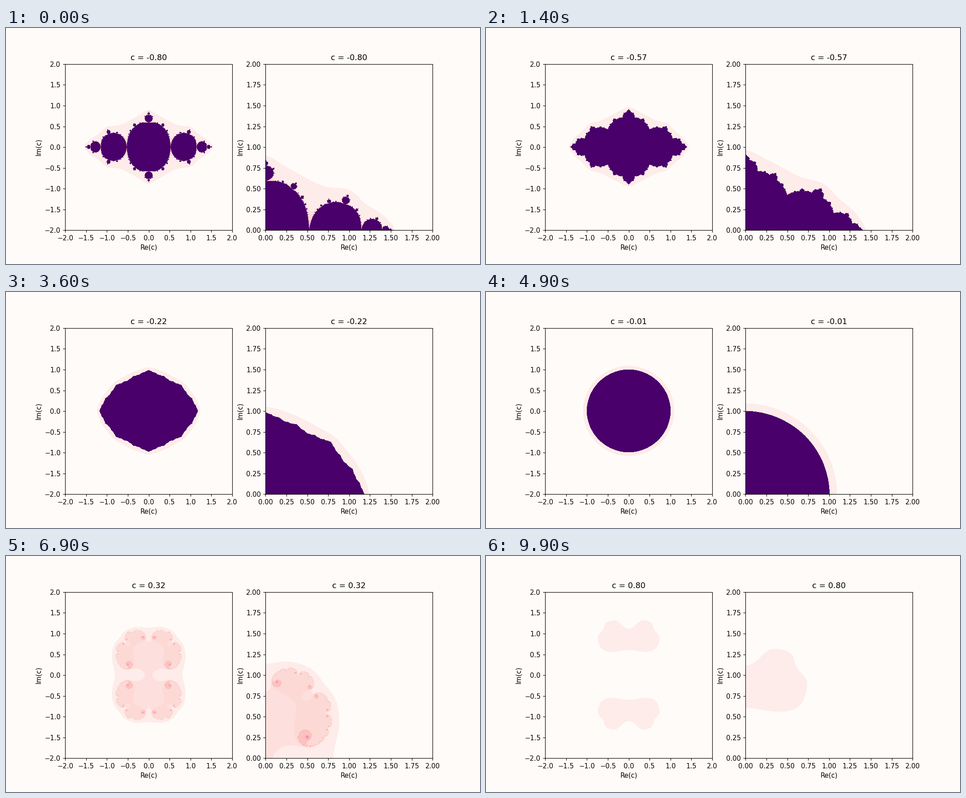
Recreate the animation shown at these times as a matplotlib script. Size 1058x529 px, loop 10 s.

```python
import matplotlib as mpl
import matplotlib.pyplot as plt
import numpy as np
from matplotlib.animation import FuncAnimation

FRAMES = 100
MAX_ITER = 100
ESCAPE = 4.0
PAPER = "#fffbf8"
SIDE = 373  # grid points across one panel

c_values = np.linspace(-0.8, 0.8, FRAMES)
axis = np.linspace(0, 2, SIDE)
quadrant = (axis[None, :] + 1j * axis[:, None]).ravel()


def build_palette():
    """RdPu over the iteration counts, with flat bands at the pale end."""
    pal = mpl.colormaps["RdPu"](np.arange(MAX_ITER + 1) / MAX_ITER)
    pal[22:32] = pal[26]
    bands = [(0, 5, PAPER), (5, 12, "#fdece9"),
             (12, 14, "#fddfdd"), (14, 22, "#fcd9d5")]
    for lo, hi, color in bands:
        pal[lo:hi] = mpl.colors.to_rgba(color)
    return (pal * 255).round().astype(np.uint8)


def escape_counts(c):
    """Number of steps each point of the first quadrant stays bounded."""
    counts = np.full(quadrant.size, MAX_ITER)
    index = np.arange(quadrant.size)
    z = quadrant
    for k in range(MAX_ITER):
        inside = z.real ** 2 + z.imag ** 2 <= ESCAPE ** 2
        if not inside.all():
            counts[index[~inside]] = k
            index, z = index[inside], z[inside]
        z = z * z + c
    return counts.reshape(SIDE, SIDE)


def mirror(q):
    """Unfold a quadrant into the full symmetric square."""
    half = np.concatenate([q[:, :0:-1], q], axis=1)
    return np.concatenate([half[:0:-1], half], axis=0)


def make_panel(ax, low):
    blank = np.zeros((SIDE, SIDE, 4), np.uint8)
    image = ax.imshow(blank, origin="lower", extent=(low, 2, low, 2),
                      interpolation="nearest")
    ticks = np.linspace(low, 2, 9)
    ax.set(xlabel="Re(c)", ylabel="Im(c)", xticks=ticks, yticks=ticks,
           facecolor=PAPER)
    return image


palette = build_palette()
plt.rcParams["font.family"] = "DejaVu Sans"
fig, (ax_full, ax_zoom) = plt.subplots(1, 2, figsize=(10, 5), dpi=105.8,
                                       facecolor=PAPER)
full = make_panel(ax_full, -2)
zoom = make_panel(ax_zoom, 0)


def update(i):
    c = c_values[i]
    counts = escape_counts(c)
    zoom.set_data(palette[counts])
    full.set_data(palette[mirror(counts[::2, ::2])])
    for ax in (ax_full, ax_zoom):
        ax.set_title(f"c = {c:.2f}")
    return full, zoom


anim = FuncAnimation(fig, update, frames=FRAMES, interval=100, repeat=True,
                     repeat_delay=0, blit=False)
plt.show()
```
